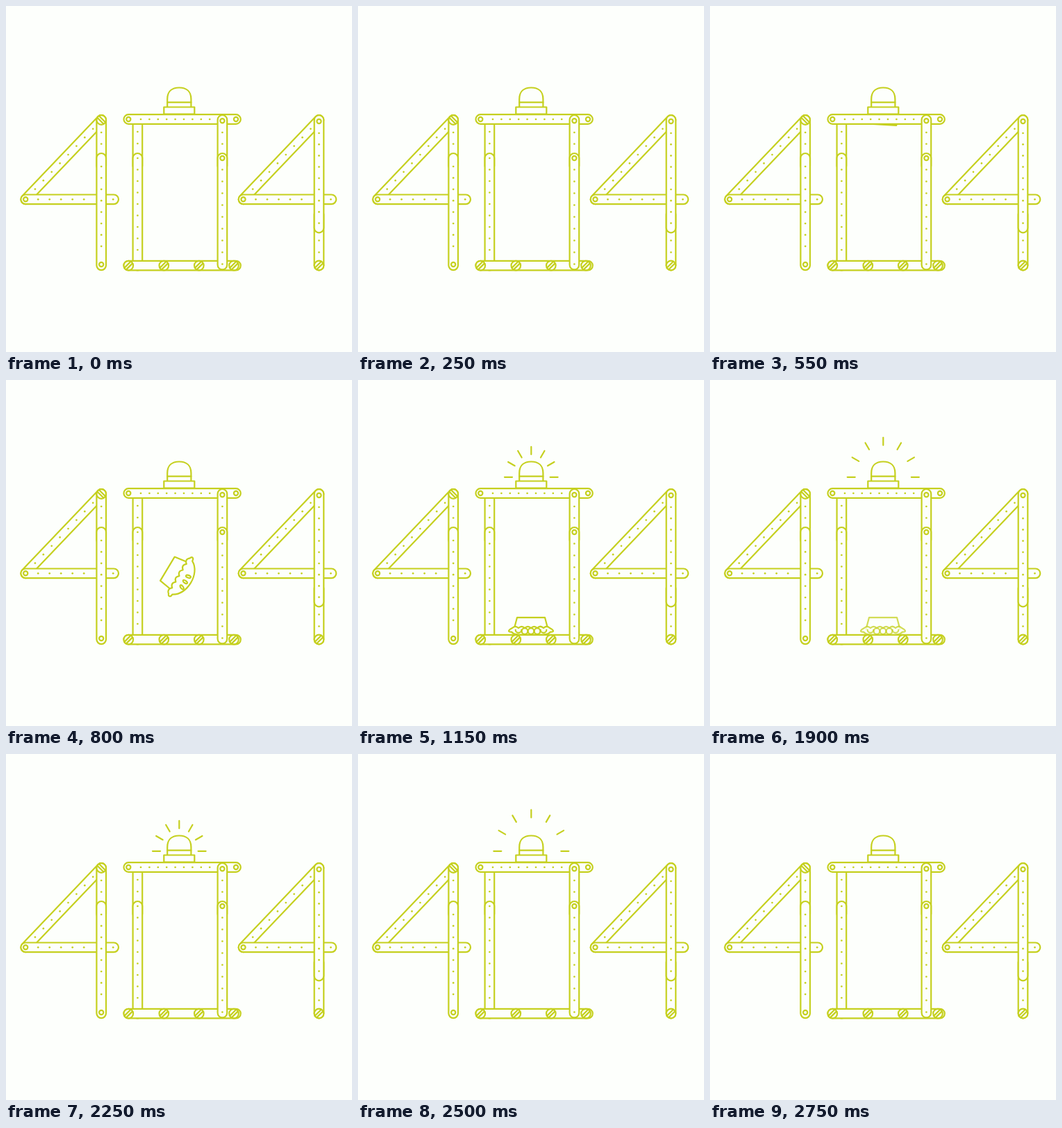
An HTML page with a canvas for the animation above (2.8 s loop, 498 px wide and 498 px high).

```html
<!DOCTYPE html>
<html lang="en">
<head>
<meta charset="utf-8">
<title>404</title>
<style>
html, body { margin: 0; width: 100%; height: 100%; overflow: hidden; background: #fdfffc; }
canvas { display: block; }
</style>
</head>
<body>
<canvas id="stage" width="498" height="498"></canvas>
<script>
const ctx = document.getElementById('stage').getContext('2d');
const PAPER = '#fdfffc', INK = '#c5d01f';
const LOOP = 2800, STEP = 50;
const DROP = 500, LAND = 866, ALARM = 1150, ALARM_END = 2700, PULSE = 550;
const CLEAR = 1850, CLEAR_END = 2050;
const TAU = Math.PI * 2, R = 6.8;

function shape(build, fill = true) {
  ctx.beginPath();
  build();
  if (fill) ctx.fill();
  ctx.stroke();
}

function line(...points) {
  shape(() => points.forEach(([x, y], i) => i ? ctx.lineTo(x, y) : ctx.moveTo(x, y)), false);
}

function bar(x1, y1, x2, y2) {
  const a = Math.atan2(y2 - y1, x2 - x1);
  shape(() => {
    ctx.arc(x1, y1, R, a + Math.PI / 2, a + Math.PI * 1.5);
    ctx.arc(x2, y2, R, a - Math.PI / 2, a + Math.PI / 2);
    ctx.closePath();
  });
}

function ring(x, y, r = 3.1) {
  shape(() => ctx.arc(x, y, r, 0, TAU));
}

function screw(x, y, angle = -Math.PI / 4) {
  ring(x, y, R);
  ctx.save();
  ctx.translate(x, y);
  ctx.rotate(angle);
  for (const s of [-1.8, 1.8]) line([-6.4, s], [6.4, s]);
  ctx.restore();
}

function dots(x, y, dx, dy, count) {
  ctx.fillStyle = INK;
  for (let i = 0; i < count; i++) {
    ctx.beginPath();
    ctx.arc(x + dx * i, y + dy * i, 1.35, 0, TAU);
    ctx.fill();
  }
  ctx.fillStyle = PAPER;
}

// Arms shared by both fours; x is the centre of the upright
function fourArms(x) {
  bar(x - 109, 278.3, x, 164);
  dots(x - 12, 176.8, -11.9, 12.4, 8);
  bar(x - 109, 278.3, x + 18, 278.3);
  ring(x - 109, 278.3);
  dots(x - 91, 278.3, 16.5, 0, 5);
  dots(x + 17, 278.3, 1, 0, 1);
}

function leftFour() {
  const x = 137.2;
  fourArms(x);
  bar(x, 164, x, 230);
  dots(x, 182, 0, 16.5, 2);
  bar(x, 218.8, x, 373.3);
  dots(x, 231, 0, 16.4, 8);
  ring(x, 372);
  screw(x, 164, Math.PI / 4);
}

function rightFour() {
  const x = 450.5;
  fourArms(x);
  bar(x, 300, x, 373.5);
  dots(x, 337.5, 0, 17, 2);
  screw(x, 373.5);
  bar(x, 164, x, 319.5);
  ring(x, 166);
  dots(x, 183, 0, 16.2, 9);
}

function zero() {
  const left = 189.4, right = 311.4, top = 163, bottom = 373.6;
  bar(left, top, left, 230);
  dots(left, 181, 0, 17, 2);
  bar(left, 218.8, left, bottom);
  dots(left, 219, 0, 16.5, 9);

  bar(176.3, top, 331, top);
  ring(176.3, top);
  ring(331, top);
  dots(194, top, 12.4, 0, 9);

  bar(176.3, bottom, 331, bottom);
  for (const x of [176.3, 227.3, 277.8, 328]) screw(x, bottom);

  bar(right, 163.8, right, 230);
  ring(right, 165.3);
  dots(right, 182, 0, 16.5, 2);
  bar(right, 218.8, right, 372.6);
  ring(right, 219);
  dots(right, 235.5, 0, 17, 9);
}

function lamp() {
  shape(() => {
    ctx.moveTo(232.2, 145.5);
    ctx.lineTo(232.2, 134);
    ctx.bezierCurveTo(232.2, 123, 239, 117.5, 249.3, 117.5);
    ctx.bezierCurveTo(259.5, 117.5, 266.4, 123, 266.4, 134);
    ctx.lineTo(266.4, 145.5);
  });
  line([232.2, 138.7], [266.4, 138.7]);
  shape(() => ctx.rect(227.3, 145.5, 44, 10));
}

function rays(time) {
  if (time < ALARM || time >= ALARM_END) return;
  const push = 8 * (1 - Math.cos(TAU * (time - ALARM) / PULSE));
  for (let i = 0; i <= 6; i++) {
    const a = i * Math.PI / 6;
    const at = d => [249.3 + (38.3 + d) * Math.cos(a), 139.8 - (43.7 + d) * Math.sin(a)];
    line(at(push - 11), at(push));
  }
}

function flyingCake() {
  shape(() => {
    ctx.moveTo(-23, 0);
    ctx.lineTo(-20, -20);
    ctx.lineTo(20, -20);
    ctx.lineTo(23, 0);
  });
  shape(() => {
    ctx.moveTo(-30, 0);
    for (let i = 0; i < 6; i++) {
      const x = -30 + i * 10;
      ctx.quadraticCurveTo(x + 5, -6, x + 10, 0);
    }
    ctx.bezierCurveTo(34, 1, 33, 5, 28, 5);
    ctx.bezierCurveTo(18, 24, -18, 24, -28, 5);
    ctx.bezierCurveTo(-33, 5, -34, 1, -30, 0);
  });
  for (const x of [-12, -3, 6]) {
    shape(() => ctx.ellipse(x, 11.5, 1.8, 3.6, -x * 0.03, 0, TAU));
  }
}

function landedCake() {
  shape(() => {
    ctx.moveTo(224.5, 359);
    ctx.lineTo(229, 341.8);
    ctx.lineTo(269, 341.8);
    ctx.lineTo(273.5, 359);
  });
  shape(() => {
    ctx.moveTo(222, 357);
    ctx.bezierCurveTo(216, 360, 215, 363, 221, 362.5);
    ctx.quadraticCurveTo(224, 366.5, 232, 366.5);
    ctx.lineTo(266, 366.5);
    ctx.quadraticCurveTo(274, 366.5, 277, 362.5);
    ctx.bezierCurveTo(283, 363, 282, 360, 276, 357);
    for (let x = 276; x > 222; x -= 9) ctx.quadraticCurveTo(x - 4.5, 352.5, x - 9, 357);
  });
  for (const x of [240, 249, 258]) shape(() => ctx.arc(x, 361.5, 4.3, 0, TAU), false);
  for (const x of [231, 267]) shape(() => ctx.arc(x, 359.5, 4.3, 0, Math.PI), false);
}

function cake(time) {
  if (time < DROP || time >= CLEAR_END) return;
  ctx.save();
  if (time < LAND) {
    const p = ((time - DROP) / (LAND - DROP)) ** 2;
    ctx.beginPath();
    ctx.rect(197, 171, 107, 196);
    ctx.clip();
    ctx.translate(249.5, 147 + 201 * p);
    ctx.rotate(Math.PI * (p - 1));
    flyingCake();
  } else {
    ctx.globalAlpha = Math.min(1, (CLEAR_END - time) / (CLEAR_END - CLEAR));
    landedCake();
  }
  ctx.restore();
}

function draw(now) {
  const time = Math.floor(now % LOOP / STEP) * STEP;
  ctx.fillStyle = PAPER;
  ctx.fillRect(0, 0, 498, 498);
  ctx.strokeStyle = INK;
  ctx.lineWidth = 2.2;
  ctx.lineCap = ctx.lineJoin = 'round';
  leftFour();
  rightFour();
  lamp();
  zero();
  cake(time);
  rays(time);
}

const start = performance.now();
function tick() {
  draw(performance.now() - start);
  requestAnimationFrame(tick);
}
tick();
</script>
</body>
</html>
```
